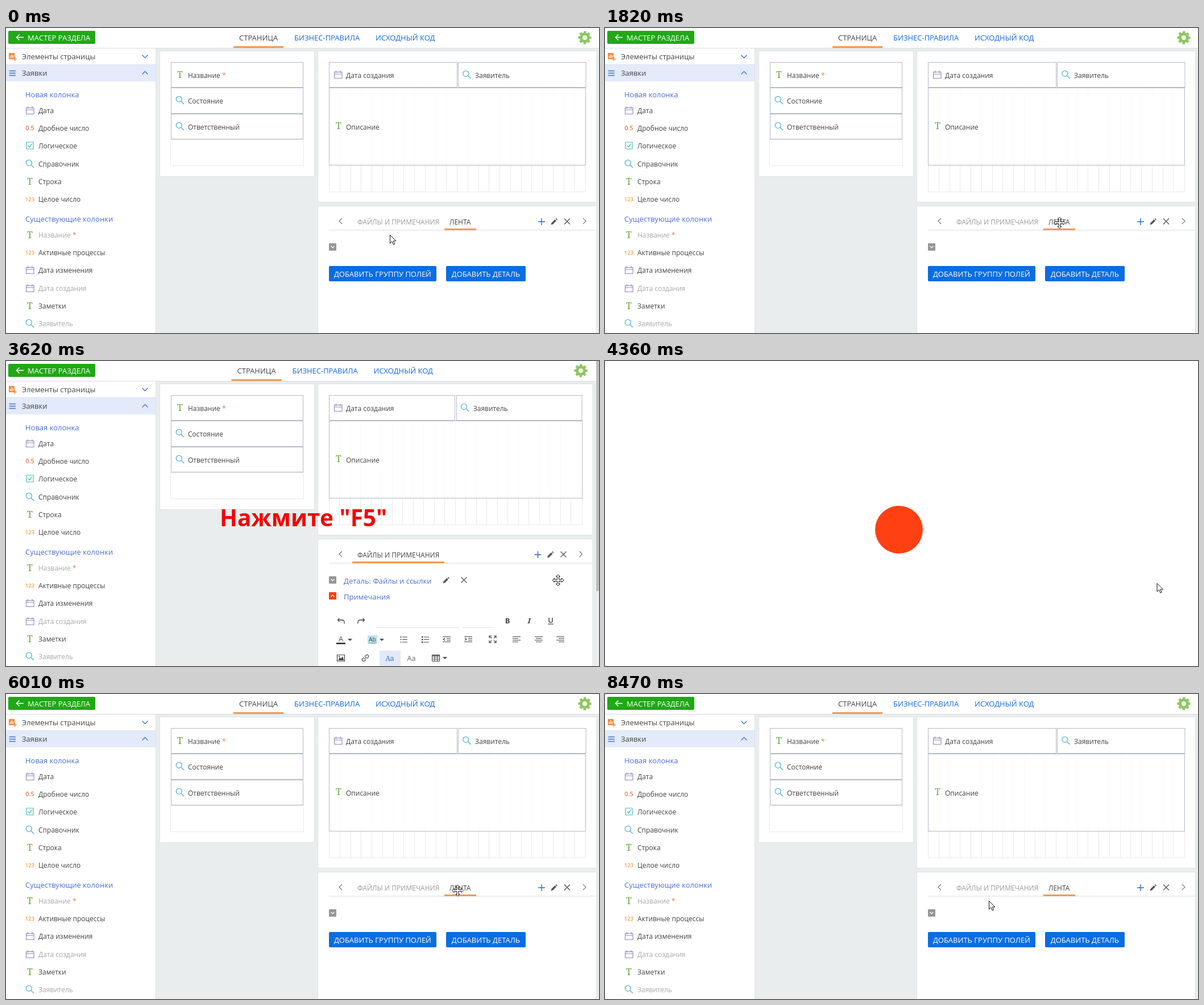
An HTML page for the animation above (8530 ms loop, 1043 by 537 pixels).

```html
<!DOCTYPE html>
<html lang="ru">
<head>
<meta charset="utf-8">
<title>Мастер раздела</title>
<style>
html, body { margin: 0; width: 100%; height: 100%; overflow: hidden; background: #fff; }
svg { display: block; font-family: "Open Sans", "Noto Sans", sans-serif; }
text { white-space: pre; }
</style>
</head>
<body>
<svg id="stage" width="1043" height="537" viewBox="0 0 1043 537"></svg>
<script>
const DARK = '#444', GREY = '#9b9b9b', BLUE = '#4b6fd0', LINK = '#1268dd', ORANGE = '#f39a4e';

// Basic shapes
const text = (x, y, s, size = 12, fill = DARK, more = '') =>
  `<text x="${x}" y="${y}" font-size="${size}" fill="${fill}" ${more}>${s}</text>`;
const rect = (x, y, w, h, fill, more = '') =>
  `<rect x="${x}" y="${y}" width="${w}" height="${h}" fill="${fill}" ${more}/>`;
const frame = (x, y, w, h, stroke, fill = '#fff') =>
  rect(x + .5, y + .5, w, h, fill, `stroke="${stroke}"`);
const line = (d, stroke, width = 1.2, more = '') =>
  `<path d="${d}" fill="none" stroke="${stroke}" stroke-width="${width}" ${more}/>`;
const at = (x, y, s) => `<g transform="translate(${x} ${y})">${s}</g>`;
const on = (name, s) => `<g data-on="${name}">${s}</g>`;
const star = '<tspan fill="#ee7b4d"> *</tspan>';

// Icons, centred on their point
const late = draw => (x, y) => on('late', at(x, y, draw));
const icon = {
  search: (x, y) => at(x, y,
    `<circle cx="-1.7" cy="-1.7" r="5" fill="none" stroke="#55b3da" stroke-width="1.3"/>` +
    line('M2 2L7 7', '#55b3da', 1.4)),
  str: late(text(0, 5.5, 'T', 16, '#62a83a', 'text-anchor="middle" font-family="Noto Serif, serif"')),
  date: late(line('M-6.5 -4.5H7V6.5H-6.5ZM-6.5 -1H7M-3.5 -7V-3M4 -7V-3', '#8e88b8', 1.1)),
  frac: late(text(0, 4, '0.5', 11, '#e07a55', 'text-anchor="middle" font-weight="600"')),
  int: late(text(0, 3.5, '123', 9.5, '#eda040', 'text-anchor="middle" font-weight="600"')),
  bool: late(line('M-6 -6H6V6H-6Z', '#45bdb9', 1.2) + line('M-3 0L-.7 2.7L3.5 -3', '#45bdb9', 1.3))
};
const cross = (x, y) => at(x, y, line('M-5 -5L5 5M5 -5L-5 5', '#555', 1.3));
const pencil = (x, y) => at(x, y,
  '<path d="M-5.5 5.5L-4.5 2L1.5 -4L4 -1.5L-2 4.5ZM2.5 -5L3.8 -6L6 -3.8L5 -2.5Z" fill="#555"/>');
const chevron = (x, y, dir, color, r = 5, width = 1.4) =>
  line(`M${x - r} ${y - dir * r / 2}l${r} ${dir * r}l${r} ${-dir * r}`, color, width);
const toggle = (y, dir, fill) => rect(568, y - 7, 13, 13, fill, 'rx="1"') + chevron(574.5, y - .5, dir, '#fff', 3, 1.2);
const caret = (x, y) => `<path d="M${x - 4} ${y - 2}h8l-4 4z" fill="#3d4a73"/>`;
const gear = x => at(x, 17,
  '<circle r="6.5" fill="none" stroke="#8dc65f" stroke-width="5"/>' +
  '<circle r="9.7" fill="none" stroke="#8dc65f" stroke-width="3.6" stroke-dasharray="4.4 3.218" stroke-dashoffset="2.2"/>');

// Left panel
function list(y0, items) {
  return items.map(([kind, label, off], i) => {
    const y = Math.round(y0 + 31.2 * i);
    return icon[kind](42, y) + text(57, y + 4.5, label, 12, off ? '#a9a9a9' : DARK);
  }).join('');
}
function side() {
  return rect(0, 36, 263, 501, '#fff') + rect(263, 36, 1, 501, '#dde0e0') +
    rect(0, 64, 263, 1, '#dfe3ea') + rect(0, 65, 263, 29, '#e3ebfa') +
    text(28, 55, 'Элементы страницы', 13) + text(28, 84, 'Заявки', 13) +
    chevron(244.5, 50, 1, '#3c74d6') + chevron(244.5, 79, -1, '#3c74d6') +
    on('late', rect(5, 44, 10, 11, '#ef8a3f') + line('M7.5 53V49M10 53V46.5M12.5 53V48', '#fff') +
      line('M15.5 51V58M12 54.5H19', '#ef8a3f', 1.5) +
      line('M5.5 75.5H17M5.5 79.5H17M5.5 83.5H17', '#6a8bc9', 2)) +
    text(34, 122, 'Новая колонка', 13, BLUE) +
    list(145, [['date', 'Дата'], ['frac', 'Дробное число'], ['bool', 'Логическое'],
      ['search', 'Справочник'], ['str', 'Строка'], ['int', 'Целое число']]) +
    text(34, 341, 'Существующие колонки', 13, BLUE) +
    list(364, [['str', 'Название' + star, 1], ['int', 'Активные процессы'], ['date', 'Дата изменения'],
      ['date', 'Дата создания', 1], ['str', 'Заметки'], ['search', 'Заявитель', 1]]);
}

// Header
const back = rect(4, 5, 153, 23, '#20a817', 'rx="2"') +
  line('M31 16.5H18.5M23.5 11.5L18.5 16.5L23.5 21.5', '#fff', 1.6) +
  text(38, 22, 'МАСТЕР РАЗДЕЛА', 13, '#fff');
const head = dx => text(410 - dx, 22, 'СТРАНИЦА', 13) + text(507 - dx, 22, 'БИЗНЕС-ПРАВИЛА', 13, LINK) +
  text(650 - dx, 22, 'ИСХОДНЫЙ КОД', 13, LINK) + rect(400 - dx, 32, 88, 3, ORANGE) + gear(1018 - dx * 2);

// Cards; cut is the width taken by the scrollbar
function cards(cut) {
  const right = 1039 - cut, w = 450 - cut * .93, half = w / 2 - 1.5, edge = '#dfe3e3', field = '#b3b9c9';
  const column = w / 24;
  let grid = '';
  for (let i = 1; i < 24; i++) {
    const x = Math.round(569 + i * column) - .5;
    grid += line(`M${x} 107V241`, '#fafafa', 1) + line(`M${x} 242V288`, '#e9e9e9', 1);
  }
  return frame(270, 40, 272, 221, edge) + frame(548, 40, right - 549, 266, edge) + frame(548, 313, right - 549, 230, edge) +
    frame(289, 196, 234, 46, '#e9e9e9') +
    frame(290, 60, 232, 44, field) + frame(290, 105, 232, 45, field) + frame(290, 151, 232, 44, field) +
    icon.str(306, 82) + text(320, 88, 'Название' + star) +
    icon.search(306, 127) + text(320, 133, 'Состояние') +
    icon.search(306, 173) + text(320, 179, 'Ответственный') +
    frame(568, 241, w + 1, 47, '#e9e9e9') +
    frame(568, 60, Math.round(half) + 1, 44, field) +
    frame(Math.round(569 + half + 2.5), 60, Math.round(half) + .5, 44, field) +
    frame(568, 105, Math.round(w) + 1, 136, field) + grid +
    icon.date(584, 82) + text(598, 88, 'Дата создания') +
    icon.search(810.5 - cut / 2, 82) + text(825 - cut / 2, 88, 'Заявитель') +
    icon.str(585, 172) + text(598, 179, 'Описание') +
    rect(568, 355.5, right - 568, 1, '#d9dcdc') +
    line('M591 335L586 340L591 345', '#777') + line(`M${1015 - cut} 335l5 5l-5 5`, '#777') +
    on('late', line(`M${942 - cut} 335v12m-6 -6h12`, '#2c66c9', 1.4) + pencil(964 - cut, 341) + cross(987 - cut, 340.5));
}

const button = (x, w, label) => rect(x, 419, w, 27, '#0a6de2', 'rx="2"') +
  text(x + w / 2, 438, label, 13, '#fff', 'text-anchor="middle"');
const feed = text(618, 346, 'ФАЙЛЫ И ПРИМЕЧАНИЯ', 12, GREY) + text(780, 346, 'ЛЕНТА') +
  rect(771, 353, 56, 3, ORANGE) + toggle(386, 1, '#979797') +
  button(568, 189, 'ДОБАВИТЬ ГРУППУ ПОЛЕЙ') + button(774, 140, 'ДОБАВИТЬ ДЕТАЛЬ');

// Rich text toolbar
const rows = (x, y, spans) => line(spans.map(([a, b], i) => `M${x + a} ${y - 5 + i * 3}H${x + b}`).join(''), DARK, 1.2);
const mark = (x, y, s, more) => text(x, y, s, 13, DARK, 'text-anchor="middle" ' + more);
function toolbar() {
  const bar = [-7, 7], short = [-7, 3];
  const bent = line('M-5.5 -2H2Q6 -2 6 2V4.5M-2.5 -5L-5.5 -2L-2.5 1', DARK, 1.3);
  const indent = x => rows(x, 490.5, [bar, [0, 7], [0, 7], bar]);
  const items = x => line(`M${x - 2} 486H${x + 7}M${x - 2} 490.5H${x + 7}M${x - 2} 495H${x + 7}`, DARK);
  return at(589, 458, bent) + at(625, 458, `<g transform="scale(-1 1)">${bent}</g>`) +
    line('M653 469.5H797M803 469.5H858', '#bbb', 1, 'stroke-dasharray="1 1"') +
    mark(882, 462, 'B', 'font-weight="700"') +
    mark(920, 462, 'I', 'font-style="italic" font-weight="600" font-family="Noto Serif, serif"') +
    mark(958, 461, 'U', 'font-weight="600"') + rect(953, 462.5, 10, 1.2, DARK) +
    mark(589, 494, 'A', '') + rect(581, 496, 16, 2.5, '#222') + caret(605, 491) +
    rect(636, 483, 17, 15, '#bfe3f5') + text(644.5, 494, 'Ab', 10.5, DARK, 'text-anchor="middle"') +
    rect(638, 496, 13, 1, '#7b97a5') + caret(661, 491) +
    items(699) + line('M694.5 484V488M693 490.5H696M693 495H696', DARK, 1) +
    items(737) + line('M731 486h2.5M731 490.5h2.5M731 495h2.5', DARK, 2.5) +
    indent(775) + line('M772 488L769 490L772 492', DARK) + indent(813) + line('M807 488L810 490L807 492', DARK) +
    at(856, 490, line('M-6 -2V-6H-2M2 -6H6V-2M6 2V6H2M-2 6H-6V2M-5.5 -5.5L-2 -2M5.5 -5.5L2 -2M5.5 5.5L2 2M-5.5 5.5L-2 2', DARK)) +
    rows(898, 490.5, [bar, short, bar, short]) + rows(937, 490.5, [bar, [-5, 5], bar, [-5, 5]]) +
    rows(975, 490.5, [bar, [-3, 7], bar, [-3, 7]]) +
    at(589, 523, line('M-6.5 -5.5H6.5V5.5H-6.5Z', DARK) + '<path d="M-5 4L-2 -1L0 1L3 -3L5.5 4Z" fill="#444"/><circle cx="-3" cy="-2.5" r="1.2" fill="#444"/>') +
    at(632, 523, '<g transform="rotate(-45)">' + line('M-1 -2.5H-4.5A2.5 2.5 0 0 0 -4.5 2.5H-1M1 -2.5H4.5A2.5 2.5 0 0 1 4.5 2.5H1M-3 0H3', DARK) + '</g>') +
    on('pick', rect(657, 510, 37, 27, '#e2e9f9')) +
    text(675, 528, 'Aa', 12, '#2f6fce', 'text-anchor="middle" font-family="Noto Serif, serif"') +
    text(713, 528, 'Aa', 12.5, '#666', 'text-anchor="middle"') +
    at(756, 523, line('M-6.5 -5.5H6.5V5.5H-6.5ZM-6.5 -2H6.5M-6.5 2H6.5M-2 -5.5V5.5M2.5 -5.5V5.5', DARK, 1) + rect(-6.5, -6, 13, 2, DARK)) +
    caret(772, 523);
}
const files = text(618, 346, 'ФАЙЛЫ И ПРИМЕЧАНИЯ') + on('tab', text(780, 346, 'ЛЕНТА', 12, GREY)) +
  rect(609, 353, 162, 3, ORANGE) + toggle(386, 1, '#979797') + toggle(414, -1, '#ff4013') +
  on('ru', text(594, 392, 'Деталь: Файлы и ссылки', 13, BLUE)) + on('en', text(594, 392, 'Деталь: Files', 13, BLUE)) +
  on('late', pencil(774, 386) + cross(805.5, 385.5)) +
  text(594, 420, 'Примечания', 13, BLUE) + toolbar() +
  rect(1038, 0, 5, 537, '#eceff0') + rect(1038, 0, 5, 405, '#bcbebe');

// Pointers
const quarter = 'L3.5 -6.5H1.5V-1.5H6.5V-3.5L10 0L6.5 3.5V1.5H1.5V6.5H3.5L0 10L-3.5 6.5H-1.5V1.5H-6.5V3.5L-10 0L-6.5 -3.5V-1.5H-1.5V-6.5H-3.5Z';
const pointer = (id, d) => `<path id="${id}" d="${d}" fill="#fff" stroke="#111" stroke-linejoin="round"/>`;

const stage = document.getElementById('stage');
stage.innerHTML = rect(0, 0, 1043, 537, '#fff') +
  on('page', rect(0, 36, 1043, 501, '#e9eded') + rect(0, 35, 1043, 1, '#d8dcdc') + side()) +
  on('back', back) + on('wide', head(0)) +
  on('feed', cards(0) + feed) + on('files', head(3.5) + cards(6.5) + files) +
  on('note', text(523, 291, 'Нажмите "F5"', 40.5, '#f20505', 'font-weight="700" text-anchor="middle"')) +
  on('logo', '<circle cx="517" cy="297" r="42" fill="#ff4013"/>') +
  pointer('arrow', 'M.5 .5V15L3.9 11.8L6.3 17.2L8.6 16.2L6.3 11H11Z') + pointer('move', 'M0 -10' + quarter);

const LOOP = 8530;
const FEED = 'page back wide feed late', FILES = 'page back files late ';
const scenes = [
  [0, FEED], [860, FILES + 'tab ru'], [930, FILES + 'tab ru pick'], [1820, FEED],
  [3210, FILES + 'ru pick'], [3620, FILES + 'ru pick note'],
  [4280, ''], [4360, 'logo'], [4840, ''], [4910, 'back'], [4980, 'back wide'],
  [5310, 'page back files tab en'], [5390, FILES + 'tab en'], [5540, FILES + 'tab en pick'],
  [5700, FILES + 'tab ru pick'], [6010, FEED],
  [7130, FILES + 'tab ru'], [7190, FILES + 'tab ru pick'], [8470, FEED]
];
const path = [
  [0, 675, 364, 'arrow'], [430, 675, 357, 'arrow'], [490, 675, 349, 'arrow'], [550, 675.5, 341.5, 'move'],
  [1010, 690, 342, 'move'], [1080, 712, 342, 'move'], [1150, 740, 343, 'move'], [1220, 765, 343, 'move'],
  [1290, 783, 343, 'move'], [1370, 794, 343, 'move'], [1440, 799.5, 343, 'move'],
  [2590, 838, 345, 'arrow'], [2670, 905, 351, 'arrow'], [2750, 962, 355, 'arrow'], [2830, 987, 355, 'arrow'],
  [3210, 971, 386, 'move'], [4280, 970.5, 391, 'arrow'],
  [5700, 880, 365, 'arrow'], [5780, 794.5, 346, 'move'],
  [6740, 752, 348, 'move'], [6800, 719.5, 351.5, 'move'], [7810, 744, 371, 'arrow'], [8470, 675, 364, 'arrow']
];

const parts = [...stage.querySelectorAll('[data-on]')];
const pointers = ['arrow', 'move'].map(id => document.getElementById(id));
const current = (keys, t) => keys.findLast(k => k[0] <= t);
let shown;

function render(t) {
  const scene = current(scenes, t);
  if (scene !== shown) {
    shown = scene;
    const names = scene[1].split(' ');
    for (const el of parts) el.style.display = names.includes(el.dataset.on) ? '' : 'none';
  }
  const [, x, y, kind] = current(path, t);
  for (const el of pointers) {
    el.style.display = el.id === kind ? '' : 'none';
    el.setAttribute('transform', `translate(${x} ${y})`);
  }
}

const start = performance.now();
function tick() {
  render((performance.now() - start) % LOOP);
  requestAnimationFrame(tick);
}
tick();
</script>
</body>
</html>
```
